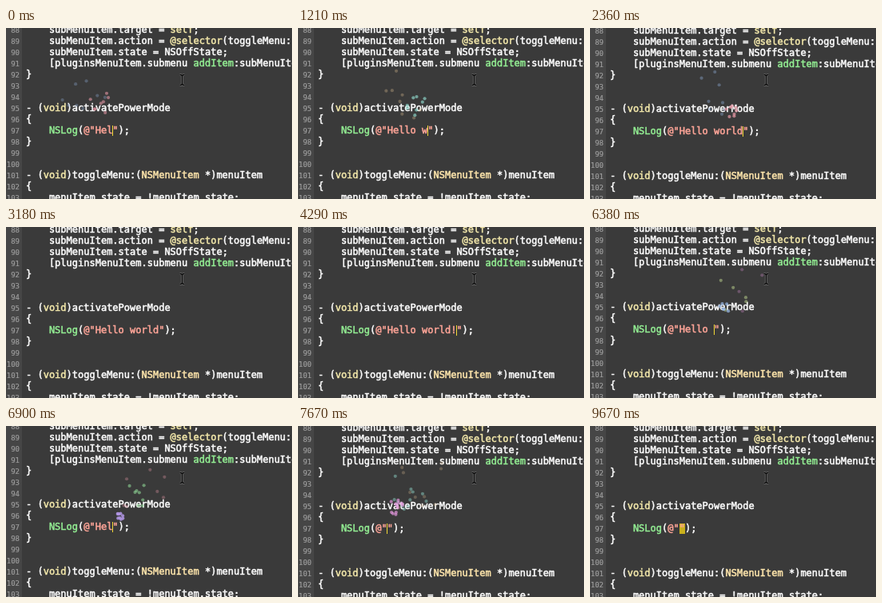
Write an HTML page with a canvas that moves like this. It is 358 px wide and 214 px high and loops after 9770 ms.

```html
<!DOCTYPE html>
<html lang="en">
<head>
<meta charset="utf-8">
<title>Typing with sparks</title>
<style>
  html, body { margin: 0; width: 100%; height: 100%; overflow: hidden; background: #3a3a3a; }
  canvas { display: block; }
</style>
</head>
<body>
<canvas id="stage" width="358" height="214"></canvas>
<script>
const W = 358, H = 214, LOOP = 9770, STEP = 57.5;
const ctx = document.getElementById('stage').getContext('2d');

// Text grid
const MONO = '"DejaVu Sans Mono", monospace';
const CELL = 7.224, LEFT = 25, LINE = 14, FIRST = 88, BASE = 6;
const QUOTE_X = LEFT + 12 * CELL;
const PHRASE = 'Hello world!';

const source = phrase => [
  '    subMenuItem.target = self;',
  '    subMenuItem.action = @selector(toggleMenu:);',
  '    subMenuItem.state = NSOffState;',
  '    [pluginsMenuItem.submenu addItem:subMenuItem];',
  '}',
  '',
  '',
  '- (void)activatePowerMode',
  '{',
  '    NSLog(@"' + phrase + '");',
  '}',
  '',
  '',
  '- (void)toggleMenu:(NSMenuItem *)menuItem',
  '{',
  '    menuItem.state = !menuItem.state;'
];

// One colour per group of the pattern
const TOKEN = /(@"[^"]*")|(\bself\b|\bvoid\b|@selector)|(\bNSMenuItem\b)|(\bNSLog\b|\baddItem\b)/g;
const TINTS = ['#ffa598', '#f5eaac', '#ffe6ac', '#93ee93'];

// Sparks move in ticks of 1/60 s
const TICK = 1000 / 60, GRAVITY = 0.075, FADE = 0.965, LIFE = 40, SPARK_Y = 123;
const SHAKE = 90;

function random(seed) {
  const v = Math.sin(seed * 127.1 + 11.7) * 43758.5453;
  return v - Math.floor(v);
}

// Key presses: steady typing with a pause before the last sign, then steady deleting
const keys = [];

function press(t, n, dir, count) {
  const i = keys.length;
  const sparks = Array.from({ length: count }, (_, k) => ({
    vx: dir * (1.8 * random(i * 20 + k) - 0.3),
    vy: -1.5 - 2 * random(i * 20 + k + 0.5)
  }));
  const color = `hsl(${(215 + 135 * i) % 360}, 58%, 74%)`;
  keys.push({ t, n, x: QUOTE_X + (n + dir) * CELL, color, sparks });
}

const full = PHRASE.length;
for (let n = 2; n <= full; n++) {
  press(2200 + 305 * (n - 11) + (n === full ? 700 : 0), n, -1, 8);
}
for (let k = 1; k <= full; k++) press(4887 + 216 * k, full - k, 1, k);

function drawText(text, x, y, color) {
  ctx.fillStyle = ctx.strokeStyle = color;
  ctx.fillText(text, x, y);
  ctx.strokeText(text, x, y);
}

function drawCode(text, y) {
  let pos = 0;
  const put = (part, color) => {
    drawText(part, LEFT + pos * CELL, y, color);
    pos += part.length;
  };
  for (const m of text.matchAll(TOKEN)) {
    put(text.slice(pos, m.index), '#ffffff');
    put(m[0], TINTS[m.slice(1).findIndex(Boolean)]);
  }
  put(text.slice(pos), '#ffffff');
}

function drawEditor(t, last) {
  ctx.fillStyle = '#464646';
  ctx.fillRect(-4, -4, 24, H + 8);

  const flash = t >= 9650;
  if (flash) {
    ctx.fillStyle = '#c9b01c';
    ctx.fillRect(112, 122, 7, 13);
  }

  source(PHRASE.slice(0, last.n)).forEach((text, row) => {
    const y = BASE + row * LINE;
    ctx.font = '9px ' + MONO;
    ctx.textAlign = 'right';
    ctx.lineWidth = 0.2;
    drawText(FIRST + row, 17, y, '#9c9c9c');
    ctx.font = '12px ' + MONO;
    ctx.textAlign = 'left';
    ctx.lineWidth = 0.5;
    drawCode(text, y);
  });

  if (!flash && (t - last.t) % 1000 < 600) {
    ctx.fillStyle = '#f2d836';
    ctx.fillRect(Math.floor(QUOTE_X + last.n * CELL), 122, 1, 13);
  }
}

function drawSparks(t) {
  for (const key of keys) {
    const a = (t - key.t) / TICK;
    if (a < 0 || a > LIFE) continue;
    ctx.globalAlpha = FADE ** a;
    ctx.fillStyle = key.color;
    for (const { vx, vy } of key.sparks) {
      ctx.beginPath();
      ctx.arc(key.x + vx * a, SPARK_Y + vy * a + GRAVITY * a * a / 2, 2.1, 0, 7);
      ctx.fill();
    }
  }
  ctx.globalAlpha = 1;
}

function drawPointer() {
  const beam = (color, width) => {
    ctx.strokeStyle = color;
    ctx.lineWidth = width;
    ctx.beginPath();
    for (const [end, neck] of [[58.5, 60.5], [71.5, 69.5]]) {
      ctx.moveTo(217.5, end);
      ctx.quadraticCurveTo(220.5, end, 220.5, neck);
      ctx.quadraticCurveTo(220.5, end, 223.5, end);
    }
    ctx.moveTo(220.5, 60);
    ctx.lineTo(220.5, 70);
    ctx.stroke();
  };
  beam('rgba(200, 200, 200, 0.5)', 2.6);
  beam('#060606', 1.4);
}

function draw(t) {
  const i = keys.findLastIndex(key => key.t <= t);
  const last = keys[i];

  ctx.fillStyle = '#3a3a3a';
  ctx.fillRect(0, 0, W, H);
  ctx.save();
  // The view jolts on each key and rests a pixel lower on a long line
  if (t - last.t < SHAKE) ctx.translate(i % 3 - 1, i % 2 ? -2 : 2);
  else ctx.translate(0, Math.floor(last.n / 10));
  drawEditor(t, last);
  ctx.restore();
  drawSparks(t);
  drawPointer();
}

function frame() {
  const t = performance.now() % LOOP;
  draw(Math.floor(t / STEP) * STEP);
  requestAnimationFrame(frame);
}
frame();
</script>
</body>
</html>
```
